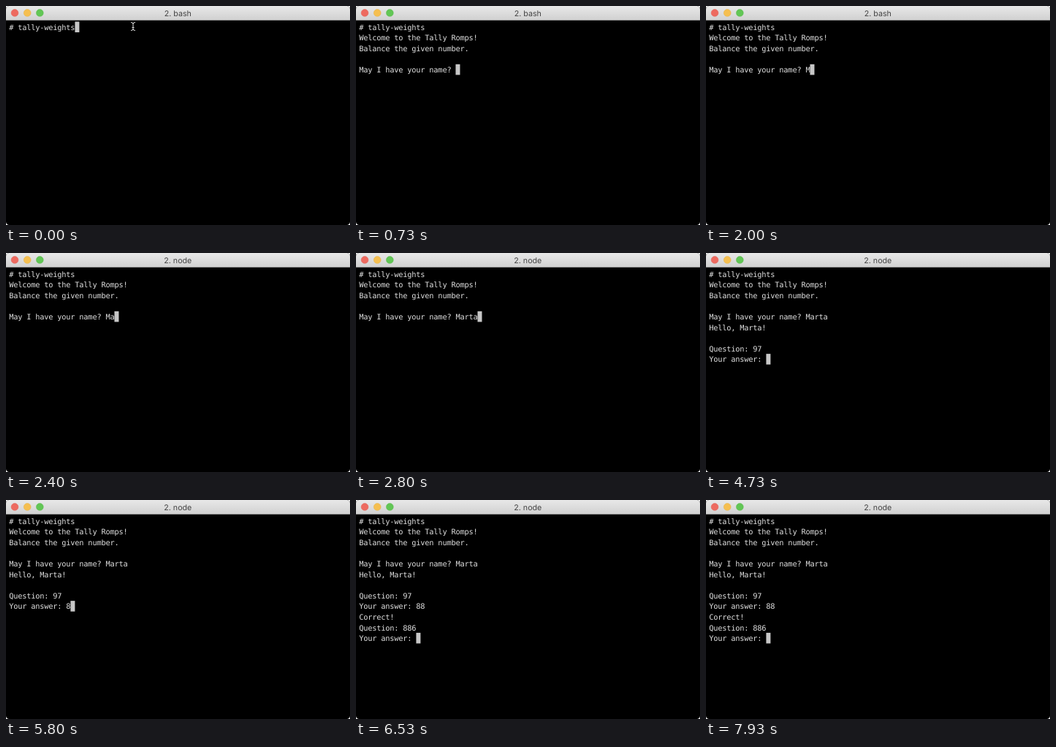
These frames come from a looping animation (471x300 px, 8000 ms). An HTML page:

```html
<!DOCTYPE html>
<html lang="en">
<head>
<meta charset="utf-8">
<title>Terminal</title>
<style>
  html, body { margin: 0; width: 100%; height: 100%; overflow: hidden; background: #fff; }
  svg { display: block; border-radius: 4.3px; }
  text { text-rendering: geometricPrecision; }
  #screen text {
    font: 10.3px "DejaVu Sans Mono", "Liberation Mono", monospace;
    letter-spacing: -.195px;
    fill: #e0e0e0;
    white-space: pre;
  }
  #title { font: 10.7px Inter, sans-serif; fill: #444; text-anchor: middle; }
</style>
</head>
<body>
<svg width="471" height="300" viewBox="0 0 471 300">
  <defs>
    <linearGradient id="bar" x2="0" y2="1">
      <stop stop-color="#e8e8e8"/>
      <stop offset="1" stop-color="#d1d1d1"/>
    </linearGradient>
  </defs>
  <rect width="471" height="300"/>
  <rect width="471" height="19" fill="url(#bar)"/>
  <rect y="19" width="471" height="1" fill="#808080"/>
  <g stroke-width=".5">
    <circle cx="12" cy="9.45" r="4.9" fill="#ed6a5f" stroke="#e0625a"/>
    <circle cx="29.2" cy="9.45" r="4.9" fill="#f5bf50" stroke="#e3b045"/>
    <circle cx="46.3" cy="9.45" r="4.9" fill="#62c655" stroke="#58b84b"/>
  </g>
  <text id="title" x="235.3" y="13.5"></text>
  <g id="screen"></g>
  <rect id="cursor" fill="#c7c7c7"/>
  <path id="pointer" fill="none" stroke="#e0e0e0"
    d="M171 22.5q3 0 3 2v7q0 2-3 2M177 22.5q-3 0-3 2M177 33.5q-3 0-3-2M172.5 29.5h3"/>
</svg>
<script>
const LOOP = 8000, ROWS = 12;
const LEFT = 4.3, TOP = 21.45, CHAR = 6.006, LINE = 14.586, BASELINE = 11.25;
const user = "Marta";

// Terminal output: [time in ms, text added]
const output = [
  [0, "# tally-weights"],
  [330, "\n"],
  [730, "Welcome to the Tally Romps!\nBalance the given number.\n\nMay I have your name? "],
  ...[2000, 2270, 2470, 2670, 2800].map((time, i) => [time, user[i]]),
  [3270, `\nHello, ${user}!\n\nQuestion: 97\nYour answer: `],
  [5730, "8"],
  [6070, "8"],
  [6330, "\nCorrect!\nQuestion: 886\nYour answer: "]
];

const byId = id => document.getElementById(id);
const title = byId("title"), cursor = byId("cursor"), pointer = byId("pointer");

function setAttrs(node, attrs) {
  for (const name in attrs) node.setAttribute(name, attrs[name]);
}

const rows = Array.from({ length: ROWS }, (_, i) => {
  const row = document.createElementNS("http://www.w3.org/2000/svg", "text");
  setAttrs(row, { x: LEFT, y: TOP + BASELINE + i * LINE });
  return byId("screen").appendChild(row);
});
setAttrs(cursor, { width: CHAR, height: LINE });

function draw(t) {
  const lines = output.filter(([time]) => t >= time).map(([, text]) => text).join("").split("\n");
  rows.forEach((row, i) => row.textContent = lines[i] || "");

  const last = lines.length - 1;
  setAttrs(cursor, { x: LEFT + lines[last].length * CHAR, y: TOP + last * LINE });

  title.textContent = t < 2330 ? "2. bash" : "2. node";
  pointer.style.display = t < 330 ? "" : "none";
}

const start = performance.now();
function tick() {
  draw((performance.now() - start) % LOOP);
  requestAnimationFrame(tick);
}
tick();
</script>
</body>
</html>
```
